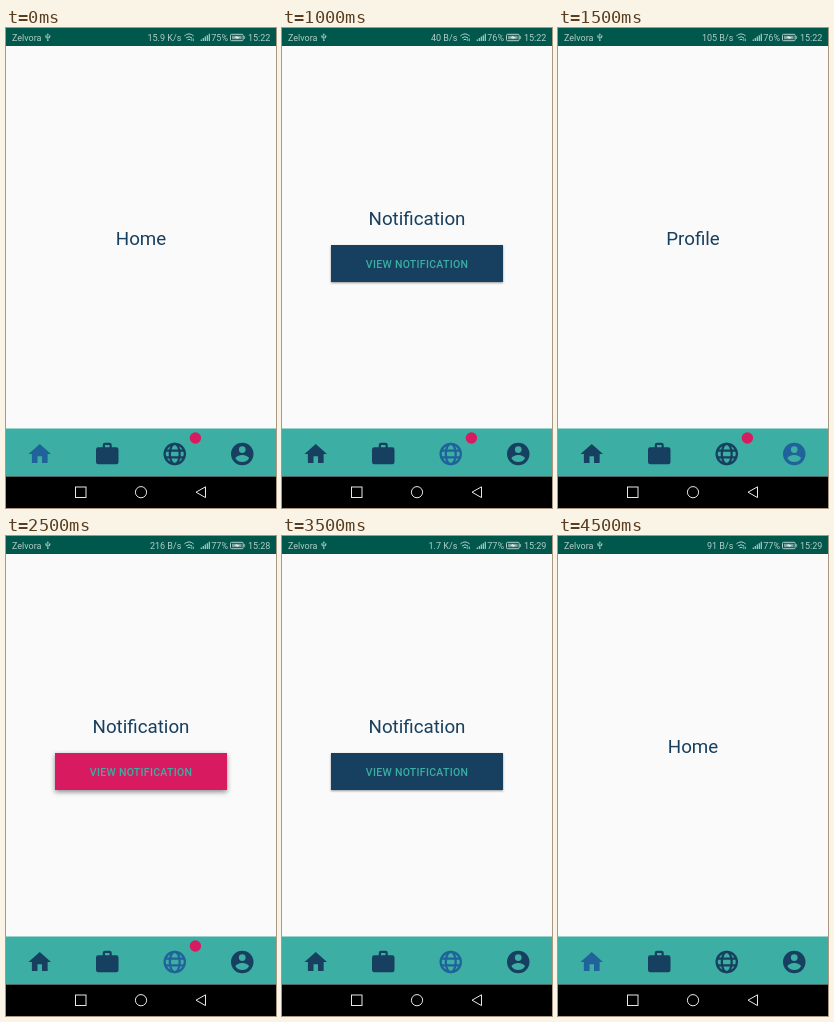
An HTML page that plays this animation: 270 px wide and 480 px high, repeating every 5000 ms.

```html
<!DOCTYPE html>
<html lang="en">
<head>
<meta charset="utf-8">
<title>Bottom navigation with badge</title>
<style>
  html, body { margin: 0; width: 100%; height: 100%; overflow: hidden; background: #000; }
  svg { display: block; width: 100vw; height: 100vh; font-family: Roboto, sans-serif; }
  .status text { font-size: 9px; fill: #b3cdc9; }
  .end { text-anchor: end; }
  .title { font-size: 18.75px; fill: #173f5f; text-anchor: middle; }
  .label { font-size: 10.5px; font-weight: 500; letter-spacing: .32px; fill: #3caea3; text-anchor: middle; }
  .face { fill: #173f5f; filter: drop-shadow(0 1px 1px rgba(0, 0, 0, .4)); }
  .pressed .face { fill: #d81b60; filter: drop-shadow(0 2px 2.5px rgba(0, 0, 0, .45)); }
  .tab { color: #173f5f; fill: currentColor; }
  .tab.on { color: #20639b; }
  .line { fill: none; stroke: currentColor; stroke-width: 2; }
  .keys { fill: none; stroke: #e8e8e8; stroke-width: 1; }
</style>
</head>
<body>
<svg viewBox="0 0 270 480">
  <rect width="270" height="480" fill="#fafafa"/>

  <g class="status">
    <rect width="270" height="18" fill="#00574b"/>
    <text x="6" y="12.7">Zelvora</text>
    <path transform="translate(37.4 4.8) scale(.37)" fill="#b3cdc9" d="M15 7v4h1v2h-3V5h2l-3-4-3 4h2v8H8v-2.1a2.2 2.2 0 1 0-2 0V13a2 2 0 0 0 2 2h3v3a2.2 2.2 0 1 0 2 0v-3h3a2 2 0 0 0 2-2v-2h1V7z"/>
    <text id="speed" class="end" x="175.3" y="12.7"></text>
    <g fill="none" stroke="#b3cdc9">
      <path d="M178.4 7.9q4.6-4 9.2 0M179.9 10q3.1-2.6 6.2 0M181.5 11.9q1.5-1.2 3 0"/>
      <path d="M185.8 10.5v2.6M187.4 10.5v2.6" stroke-width=".8"/>
      <path d="M195.3 13v-1.6M197.3 13v-3M199.3 13v-4.4M201.3 13v-5.8M203.3 13v-7.2" stroke-width="1.2"/>
      <rect x="224.5" y="6.3" width="12.6" height="6.4" rx="1"/>
    </g>
    <path fill="#b3cdc9" d="M237.6 8h1.5v3h-1.5zM226 7.8h9.6v3.4H226z" fill-opacity=".65"/>
    <path fill="#e4efed" d="M228 9.7l3.2-2v1.2h2.7l-3.2 2.3V9.8z"/>
    <text id="charge" class="end" x="222" y="12.7"></text>
    <text id="clock" class="end" x="264.3" y="12.7"></text>
  </g>

  <text id="title" class="title" x="135"></text>
  <g id="button">
    <rect class="face" x="49" y="217" width="172" height="37"/>
    <text class="label" x="135.1" y="239.6">VIEW NOTIFICATION</text>
  </g>

  <rect y="400.5" width="270" height="48" fill="#3caea3"/>
  <g class="tab" transform="translate(20.25 412.5) scale(1.125)">
    <path d="M10 20v-6h4v6h5v-8h3L12 3 2 12h3v8z"/>
  </g>
  <g class="tab" transform="translate(87.75 412.5) scale(1.125)">
    <path d="M20 6h-4V4a2 2 0 0 0-2-2h-4a2 2 0 0 0-2 2v2H4a2 2 0 0 0-2 2v11a2 2 0 0 0 2 2h16a2 2 0 0 0 2-2V8a2 2 0 0 0-2-2zm-6 0h-4V4h4z"/>
  </g>
  <g class="tab" transform="translate(155.25 412.5) scale(1.125)">
    <g class="line">
      <circle cx="12" cy="12" r="9"/>
      <ellipse cx="12" cy="12" rx="4.4" ry="9"/>
      <path d="M3.8 9h16.4M3.8 15h16.4"/>
    </g>
  </g>
  <g class="tab" transform="translate(222.75 412.5) scale(1.125)">
    <path fill-rule="evenodd" d="M12 2a10 10 0 1 0 0 20 10 10 0 0 0 0-20zm0 3a3 3 0 1 1 0 6 3 3 0 0 1 0-6zm0 14.2a7.2 7.2 0 0 1-6-3.2c0-2 4-3.1 6-3.1s6 1.100 6 3.100a7.200 7.200 0 0 1-6 3.200z"/>
  </g>
  <circle id="badge" cx="189.4" cy="410" r="5.7" fill="#d81b60"/>

  <rect y="448.5" width="270" height="31.5"/>
  <g class="keys">
    <rect x="69.500" y="459" width="10.500" height="10.500"/>
    <circle cx="135" cy="464.200" r="5.600"/>
    <path d="M190 464.200l9.500-5.400v10.800z"/>
  </g>
</svg>
<script>
  const LOOP = 5000;
  const HOME = 0, WORK = 1, NOTIFICATION = 2, PROFILE = 3;
  const titles = ["Home", "Work", "Notification", "Profile"];

  // start ms, tab, speed, charge, clock
  const steps = [
    [0, HOME, "15.9 K/s", "75%", "15:22"],
    [500, WORK, "1.2 K/s", "76%", "15:22"],
    [1000, NOTIFICATION, "40 B/s", "76%", "15:22"],
    [1500, PROFILE, "105 B/s", "76%", "15:22"],
    [2000, HOME, "94 B/s", "76%", "15:22"],
    [2500, NOTIFICATION, "216 B/s", "77%", "15:28"],
    [3500, NOTIFICATION, "1.7 K/s", "77%", "15:29"],
    [4000, PROFILE, "120 B/s", "77%", "15:29"],
    [4500, HOME, "91 B/s", "77%", "15:29"]
  ];
  const PRESS = 2500, CLEAR = 3500;

  const get = id => document.getElementById(id);
  const tabs = document.querySelectorAll(".tab");
  const show = (id, on) => get(id).setAttribute("visibility", on ? "visible" : "hidden");
  let current;

  function render(step) {
    const [start, tab, speed, charge, clock] = step;
    get("speed").textContent = speed;
    get("charge").textContent = charge;
    get("clock").textContent = clock;
    get("title").textContent = titles[tab];
    get("title").setAttribute("y", tab === NOTIFICATION ? 196.6 : 216.6);
    tabs.forEach((el, i) => el.classList.toggle("on", i === tab));
    show("button", tab === NOTIFICATION);
    show("badge", start < CLEAR);
    get("button").classList.toggle("pressed", start === PRESS);
  }

  function tick() {
    const t = performance.now() % LOOP;
    const step = steps.findLast(s => s[0] <= t);
    if (step !== current) render(current = step);
    requestAnimationFrame(tick);
  }
  tick();
</script>
</body>
</html>
```
